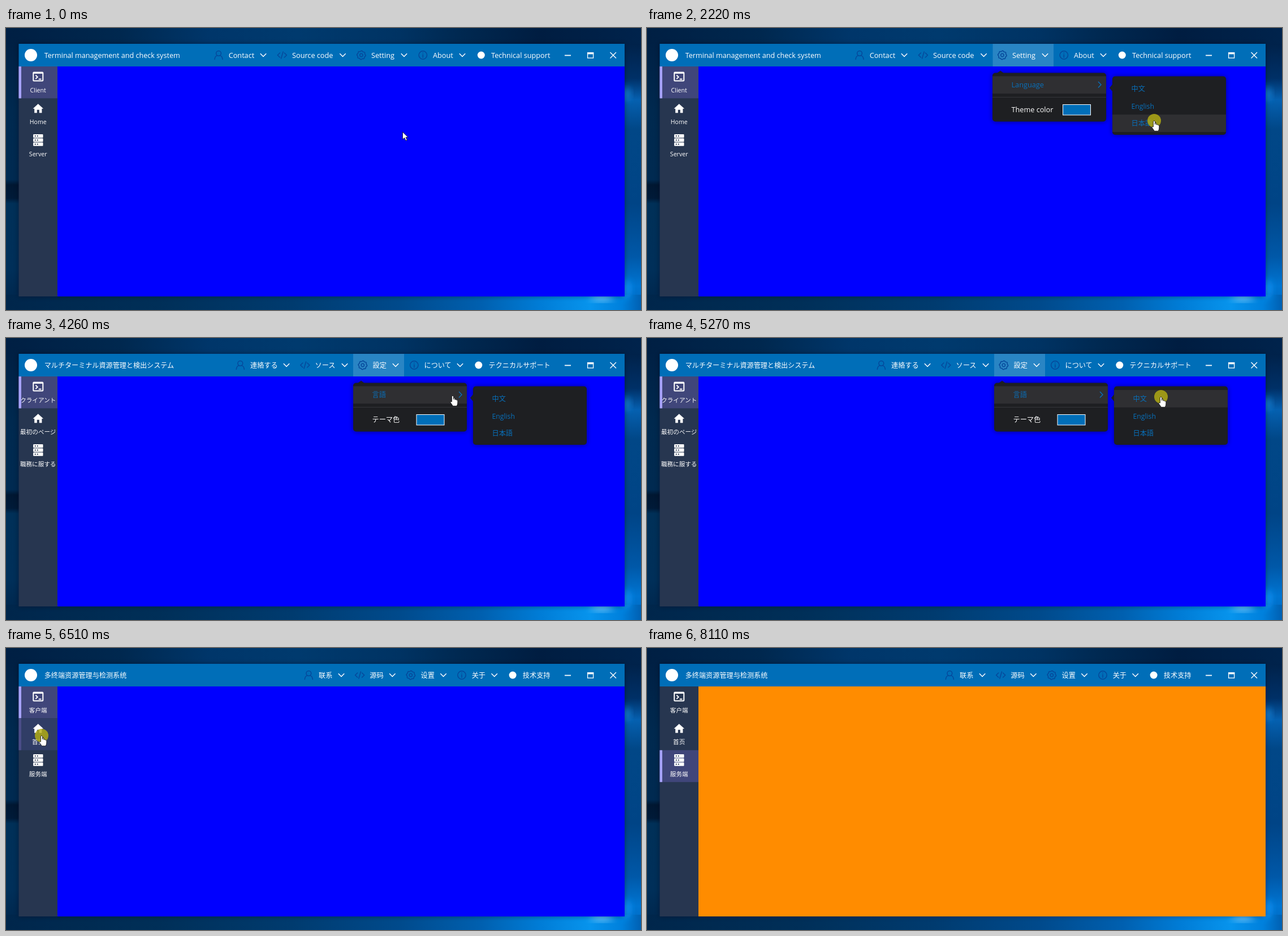
An HTML page for the animation above (8310 ms loop, 1123 by 499 pixels).

```html
<!DOCTYPE html>
<html lang="en">
<head>
<meta charset="utf-8">
<title>Terminal management</title>
<style>
html, body { margin: 0; width: 100%; height: 100%; overflow: hidden; background: #01264b; }
svg { display: block; width: 100vw; height: 100vh; }
text { fill: #fff; font-family: "Open Sans", "Noto Sans CJK SC", sans-serif; white-space: pre; }
.ja text { font-family: "Open Sans", "Noto Sans CJK JP", sans-serif; }
.line { fill: none; stroke: #fff; stroke-width: 1.4; }
.dim { fill: none; stroke: #06489a; stroke-width: 1.5; stroke-linecap: round; }
.link { fill: #0870bb; }
</style>
</head>
<body>
<svg id="stage" viewBox="0 0 1123 499" preserveAspectRatio="none">
  <defs>
    <filter id="soft" x="-50%" y="-50%" width="200%" height="200%"><feGaussianBlur stdDeviation="7"/></filter>
    <filter id="shade" x="-10%" y="-10%" width="120%" height="125%"><feGaussianBlur stdDeviation="4"/></filter>
  </defs>
  <g id="wall"></g>
  <rect x="23" y="29" width="1070" height="445" fill="#000a18" opacity=".5" filter="url(#shade)"/>
  <rect x="22.5" y="28" width="1071.5" height="40" fill="#006eb8"/>
  <rect x="22.5" y="68" width="69" height="407" fill="#273650"/>
  <rect id="page" x="91" y="68" width="1003" height="407"/>
  <g id="side"></g>
  <g id="languages"></g>
  <g id="spot"><circle r="12" fill="#b5ae12" opacity=".82"/></g>
  <path id="arrow" fill="#fff" stroke="#111" stroke-width=".8" d="M-.5 0V13L2.7 10.2 5.1 15.2 7.3 14.2 5 9.4H9Z"/>
  <path id="hand" fill="#fff" stroke="#111" stroke-width=".8" stroke-linejoin="round"
    d="M-1.6 1.2Q0-.8 1.4 1.2V6.5Q3-.0 3.8 5.6V7.2Q5.6 5.4 6.3 7.8 8.4 6.8 8.8 9.4V13Q8.6 15.5 7.2 18.3H.4L-3.8 12.2Q-4.6 9.4-1.6 11Z"/>
</svg>
<script>
const LOOP = 8310;
const THEME = '#006eb8';
const byId = id => document.getElementById(id);
const show = (node, on) => { node.style.display = on ? '' : 'none'; };

const rect = (x, y, w, h, fill, extra = '') =>
  `<rect x="${x}" y="${y}" width="${w}" height="${h}" fill="${fill}" ${extra}/>`;
const label = (x, y, size, words, extra = '') =>
  `<text x="${x}" y="${y}" font-size="${size}" ${extra}>${words}</text>`;
const line = (d, extra = '') => `<path class="line" d="${d}" ${extra}/>`;
const at = (x, y, body) => `<g transform="translate(${x} ${y})">${body}</g>`;

// Wallpaper: the strips around the window, each a soft gradient
function strip(id, x, y, w, h, stops) {
  const across = w > h;
  const marks = stops.map(([p, c]) => `<stop offset="${p}%" stop-color="${c}"/>`).join('');
  return `<linearGradient id="${id}" x2="${across ? 1 : 0}" y2="${across ? 0 : 1}">${marks}</linearGradient>` +
    rect(x, y, w, h, `url(#${id})`);
}
const glow = (x, y, rx, ry, fill, opacity) =>
  `<ellipse cx="${x}" cy="${y}" rx="${rx}" ry="${ry}" fill="${fill}" opacity="${opacity}" filter="url(#soft)"/>`;

byId('wall').innerHTML =
  strip('top', 0, 0, 1123, 40, [[0, '#001f43'], [18, '#00284f'], [32, '#00366a'], [46, '#003a6e'], [62, '#003363'], [72, '#002850'], [84, '#001d41'], [100, '#00234c']]) +
  strip('left', 0, 28, 40, 471, [[0, '#002044'], [25, '#00294f'], [51, '#002a51'], [53, '#001732'], [58, '#001a38'], [60, '#003058'], [85, '#002f59'], [100, '#002449']]) +
  strip('right', 1080, 28, 43, 471, [[0, '#00224a'], [13, '#003067'], [21, '#0560b0'], [32, '#014787'], [60, '#004486'], [80, '#0058a8'], [91, '#0075d2'], [100, '#0068bd']]) +
  strip('bottom', 0, 472, 1123, 27, [[0, '#00264b'], [24, '#002f58'], [45, '#003b6f'], [62, '#004a8c'], [75, '#0060b0'], [84, '#007cd6'], [92, '#0794ed'], [97, '#0080dc'], [100, '#0060b2']]) +
  glow(1096, 116, 7, 10, '#259cf2', .75) +
  glow(1095, 462, 9, 16, '#169bff', .8) +
  glow(1054, 477, 20, 5, '#9cdcff', .85);

// Sidebar
const rowTop = i => 68 + i * 56.4;
const sideIcons = [
  `<rect x="-8.5" y="-7.5" width="17" height="15" rx="1" class="line" style="stroke-width:2"/>
   <path d="M-8-6.5H8" class="line" style="stroke-width:2.6"/>
   <path d="M-4.5-2.5L-1 .8-4.5 4M1 4.5H5.5" class="line" style="stroke-width:1.8"/>`,
  `<path fill="#fff" d="M0-8L9.3 .4H6.6V8H2V2.5H-2V8H-6.6V.4H-9.3Z"/>`,
  [-10.5, -3.3, 4].map(y => rect(-8.7, y, 17.4, 6.2, '#fff', 'rx="1"') +
    `<circle cx="-5" cy="${y + 3.1}" r="1.1" fill="#273650"/><circle cx="-1" cy="${y + 3.1}" r="1.1" fill="#273650"/>`).join('')
];
byId('side').innerHTML = sideIcons.map((icon, i) =>
  `<g class="tab">${rect(22.5, rowTop(i), 68.5, 56.4, 'none')}${rect(22.5, rowTop(i), 4.5, 56.4, 'none')}</g>` +
  at(56.8, 86 + i * 56.3, icon)).join('');
const tabs = [...document.querySelectorAll('.tab')];

// Title bar
const gear = Array.from({ length: 32 }, (_, i) => {
  const a = i * Math.PI / 16, r = i % 4 < 2 ? 7.7 : 6.7;
  return `${(r * Math.cos(a)).toFixed(1)} ${(r * Math.sin(a)).toFixed(1)}`;
}).join('L');
const barIcons = [
  '<circle class="dim" cy="-3.2" r="4.4"/><path class="dim" d="M-7 7.5Q-6.5 1.8-2.5 .6M2.5 .6Q6.5 1.8 7 7.5"/>',
  '<path class="dim" d="M-4-4L-8 0-4 4M4-4L8 0 4 4M1.8-6L-1.8 6"/>',
  `<path class="dim" d="M${gear}Z"/><circle class="dim" r="2.7"/>`,
  '<circle class="dim" r="7.2"/><path class="dim" d="M0-1V4M0-4V-3.7"/>',
  '<circle r="6.5" fill="#fff"/>'
];
const chevron = '<path class="line" d="M-5.2-2.8L0 2.6 5.2-2.8"/>';

const languages = [
  { code: 'en', size: 12.7, titleSize: 12.6, title: 'Terminal management and check system',
    side: ['Client', 'Home', 'Server'],
    bar: [['Contact', 393.7, 455], ['Source code', 506, 595.5], ['Setting', 646, 704], ['About', 755, 807], ['Technical support', 858]],
    menuX: 611, language: 'Language', theme: 'Theme color', swatch: 735.5 },
  { code: 'ja', size: 12.15, titleSize: 12.1, title: 'マルチターミナル資源管理と検出システム',
    side: ['クライアント', '最初のページ', '職務に服する'],
    bar: [['連絡する', 432, 496], ['ソース', 546.5, 599], ['設定', 648.5, 689], ['について', 739.5, 803], ['テクニカルサポート', 853.5]],
    menuX: 614, language: '言語', theme: 'テーマ色', swatch: 726 },
  { code: 'zh', size: 12.2, titleSize: 12.15, title: '多终端资源管理与检测系统',
    side: ['客户端', '首页', '服务端'],
    bar: [['联系', 553, 593], ['源码', 643.3, 683.3], ['设置', 733.5, 773.5], ['关于', 823.7, 863.7], ['技术支持', 913.8]],
    menuX: 699, language: '语言', theme: '主题颜色', swatch: 811 }
];

const shadow = (x, y, w, h) => rect(x, y, w, h, '#000', 'rx="5" opacity=".45" filter="url(#shade)"');
const subRow = i => 92 + i * 30.6;

function menu(l) {
  const x = l.menuX, sx = x + 212;
  const options = ['中文', 'English', '日本語'].map((name, i) =>
    rect(sx, subRow(i), 201, 30.8, '#2f2f32', 'class="option"') +
    label(sx + 33.5, subRow(i) + 20, 12.2, name, 'class="link"')).join('');
  return `<g class="menu">${shadow(x, 80, 201, 86)}
    <path fill="#1e1f22" d="M${x + 8} 80L${x + 14} 75.5 ${x + 20} 80Z"/>
    ${rect(x, 79.5, 201, 86, '#1e1f22', 'rx="5"')}
    ${rect(x, 85.3, 201, 30.8, '#2f2f32', 'class="first"')}
    ${label(x + 33.5, 105.3, l.size, l.language, 'class="link"')}
    ${line(`M${x + 187} 95L${x + 192} 100.3 ${x + 187} 105.6`, 'style="stroke:#0870bb"')}
    ${rect(x, 122, 201, 1, '#35363a')}
    ${label(x + 33.5, 149.3, l.size, l.theme)}
    ${rect(l.swatch, 135.5, 49, 18.5, THEME, 'stroke="#fff"')}</g>
    <g class="sub">${shadow(sx, 86, 201, 103)}
    <path fill="#1e1f22" d="M${sx} 100L${sx - 5} 106 ${sx} 112Z"/>
    ${rect(sx, 85.5, 201, 103.5, '#1e1f22', 'rx="5"')}${options}</g>`;
}

byId('languages').innerHTML = languages.map(l => {
  const setting = l.bar[2];
  const left = setting[1] - 34.5;
  const bar = l.bar.map(([name, x, chev], i) =>
    at(x - 17.7, 48, barIcons[i]) + label(x, 53, l.size, name) +
    (chev ? at(chev, 48, chevron) : '')).join('');
  const side = l.side.map((name, i) =>
    label(56.7, 113.7 + i * 56.5, 10.6, name, 'text-anchor="middle"')).join('');
  return `<g class="${l.code}">
    ${rect(left, 28, setting[2] + 15 - left, 40, '#fff', 'class="hot"')}
    <circle cx="44" cy="48" r="11" fill="#fff"/>
    ${label(67.7, 53, l.titleSize, l.title)}${bar}${side}${menu(l)}</g>`;
}).join('') +
  line('M988 48.5H999', 'style="stroke-width:1.8"') +
  rect(1028.6, 43.6, 10, 9.5, 'none', 'stroke="#fff" stroke-width="1.3"') + rect(1028, 43, 11.2, 3.4, '#fff') +
  line('M1068.5 43L1079 53.5M1079 43L1068.5 53.5');

const views = languages.map(l => {
  const root = document.querySelector('.' + l.code);
  const part = name => root.querySelector('.' + name);
  return { root, hot: part('hot'), menu: part('menu'), first: part('first'), sub: part('sub'),
    options: [...root.querySelectorAll('.option')], left: l.bar[2][1] - 34.5, right: l.bar[2][2] + 15 };
});

// Pointer stops: start time, x, y
const stops = [
  [0, 702, 184], [200, 698, 158], [400, 686, 100], [610, 673, 58], [1210, 675, 98],
  [1400, 715, 100], [1600, 795, 102], [1810, 860, 132], [2010, 897, 164],
  [2830, 835, 125], [3020, 740, 70], [3220, 692, 50], [3850, 697, 98],
  [4050, 735, 100], [4260, 790, 102], [4460, 840, 104], [4660, 880, 105], [4860, 903, 105], [5060, 909, 104],
  [5680, 700, 112], [5880, 400, 128], [6080, 150, 146], [6290, 63, 155],
  [6700, 63, 178], [6900, 63, 208]
];
const latest = (list, t) => list.filter(item => item[0] <= t).pop();
const within = (t, spans) => spans.some(([from, to]) => t >= from && t < to);
const clicks = [[800, 1010], [2220, 2430], [3450, 3650], [5270, 5470], [6510, 6700], [7100, 7300]];
const menus = [[1010, 2430], [3650, 5470]];
const submenus = [[1400, 2430], [4050, 5470]];

function draw(t) {
  const [, x, y] = latest(stops, t);
  const lang = t < 2430 ? 0 : t < 5470 ? 1 : 2;
  const tab = t < 6700 ? 0 : t < 7300 ? 1 : 2;
  const present = t < 8110;
  const menuOpen = within(t, menus), subOpen = within(t, submenus);
  const view = views[lang];
  const onSetting = y < 68 && x > view.left && x < view.right;
  const hovered = present && x < 91 ? Math.floor((y - 68) / 56.4) : -1;

  byId('page').setAttribute('fill', tab ? '#ff8c00' : '#0000ff');
  tabs.forEach((node, i) => {
    const [back, edge] = i === tab ? ['#40467a', '#a6a2fa'] : i === hovered ? ['#303d66', '#4b4d88'] : ['none', 'none'];
    node.children[0].setAttribute('fill', back);
    node.children[1].setAttribute('fill', edge);
  });

  views.forEach((v, i) => show(v.root, i === lang));
  view.hot.setAttribute('opacity', menuOpen ? .16 : onSetting ? .12 : 0);
  show(view.menu, menuOpen);
  show(view.first, y > 85 || subOpen);
  show(view.sub, subOpen);
  view.options.forEach((node, i) =>
    show(node, x > view.left + 212 && y >= subRow(i) && y < subRow(i + 1)));

  const hand = onSetting || menuOpen || x < 91;
  const place = `translate(${x} ${y})`;
  for (const id of ['spot', 'arrow', 'hand']) byId(id).setAttribute('transform', place);
  show(byId('spot'), within(t, clicks));
  show(byId('hand'), present && hand);
  show(byId('arrow'), present && !hand);
}

const start = performance.now();
function tick() {
  draw((performance.now() - start) % LOOP);
  requestAnimationFrame(tick);
}
tick();
</script>
</body>
</html>
```
